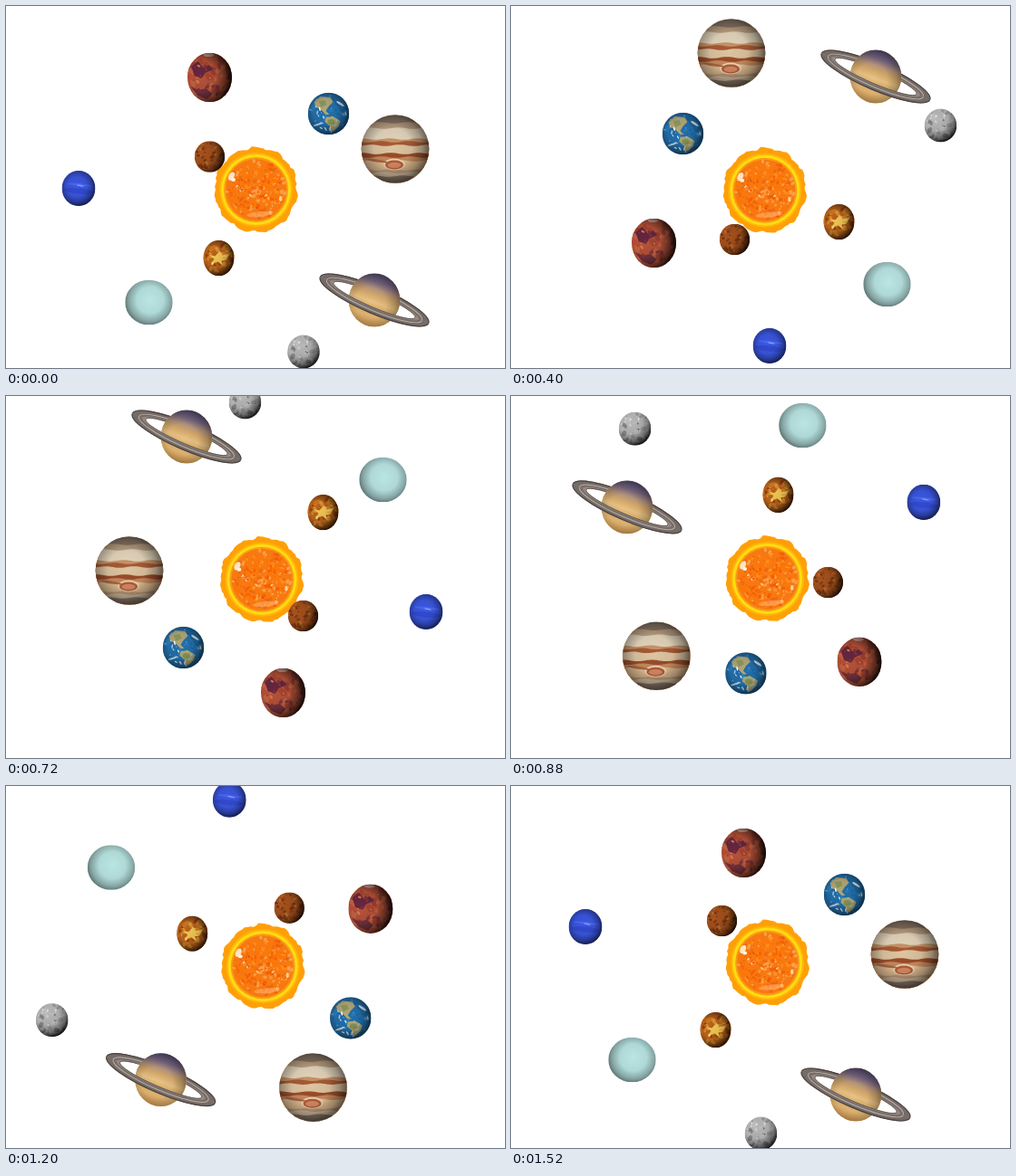
Recreate the animation shown at these times as an HTML page with a canvas. Size 550x400 px, loop 1.6 s.

```html
<!DOCTYPE html>
<html lang="en">
<head>
<meta charset="utf-8">
<title>Planets around the Sun</title>
<style>
  html, body { margin: 0; width: 100%; height: 100%; overflow: hidden; background: #fff; }
  canvas { display: block; width: 550px; height: 400px; }
</style>
</head>
<body>
<canvas id="stage" width="550" height="400"></canvas>
<script>
const ctx = document.getElementById('stage').getContext('2d');
const TAU = Math.PI * 2;
const STEP = 80, STEPS = 20;
const KEY_STEPS = [0, 3, 5, 9, 13, 17, 19];

function seeded(seed) {
  return () => {
    seed = (seed * 16807) % 2147483647;
    return seed / 2147483647;
  };
}

// Orbits: waypoints become angle and radius; `square` bulges the path at its diagonals.
function orbit(points, { cx = 282, cy = 201, sx = 1, square = 0.035 } = {}) {
  const bulge = a => 1 - square * Math.cos(4 * a);
  const angles = [], radii = [];
  points.forEach(([x, y], i) => {
    const dx = (x - cx) / sx, dy = y - cy;
    let a = Math.atan2(dy, dx);
    while (i && a > angles[i - 1]) a -= TAU;
    angles.push(a);
    radii.push(Math.hypot(dx, dy) / bulge(a));
  });
  const angleAt = spline(angles), radiusAt = spline(radii);
  return k => {
    const a = angleAt(k), r = radiusAt(k) * bulge(a);
    return [cx + sx * r * Math.cos(a), cy + r * Math.sin(a)];
  };
}

function spline(values) {
  const t = KEY_STEPS, last = t.length - 1;
  const slope = i => (values[i + 1] - values[i]) / (t[i + 1] - t[i]);
  const tangent = i => {
    if (i === 0) return slope(0);
    if (i === last) return slope(last - 1);
    const before = t[i] - t[i - 1], after = t[i + 1] - t[i];
    return (slope(i - 1) * after + slope(i) * before) / (before + after);
  };
  return k => {
    let i = 0;
    while (i < last - 1 && k >= t[i + 1]) i++;
    const h = t[i + 1] - t[i], u = (k - t[i]) / h, v = 1 - u;
    return v * v * (1 + 2 * u) * values[i] + u * u * (3 - 2 * u) * values[i + 1]
      + h * u * v * (v * tangent(i) - u * tangent(i + 1));
  };
}

function oval(x, y, rx, ry, fill, tilt = 0) {
  ctx.beginPath();
  ctx.ellipse(x, y, rx, ry, tilt, 0, TAU);
  ctx.fillStyle = fill;
  ctx.fill();
}

function shape(fill, ...points) {
  ctx.beginPath();
  points.forEach(([x, y]) => ctx.lineTo(x, y));
  ctx.closePath();
  ctx.fillStyle = fill;
  ctx.fill();
}

function blotches(seed, count, size, reach, colors, flat = 0.6) {
  const rnd = seeded(seed);
  for (let i = 0; i < count; i++) {
    const a = rnd() * TAU, d = Math.sqrt(rnd()) * reach, s = size * (0.4 + rnd());
    oval(Math.cos(a) * d, Math.sin(a) * d, s, s * flat,
      colors[Math.floor(rnd() * colors.length)], rnd() * 3);
  }
}

function radial(x, y, r, ...stops) {
  const g = ctx.createRadialGradient(x, y, 0, x, y, r);
  stops.forEach(([at, color]) => g.addColorStop(at, color));
  return g;
}

// Light comes from (lx, ly), given in radii; `dark` is the depth of the shadow.
function globe(rx, ry, base, { lx = -0.45, ly = -0.25, dark = 0.9, paint }) {
  ctx.save();
  ctx.beginPath();
  ctx.ellipse(0, 0, rx, ry, 0, 0, TAU);
  ctx.clip();
  ctx.fillStyle = base;
  ctx.fillRect(-rx, -ry, rx * 2, ry * 2);
  if (paint) paint();
  const reach = rx * (1.02 + Math.hypot(lx, ly));
  ctx.fillStyle = radial(lx * rx, ly * ry, reach,
    [0, 'rgba(0,0,0,0)'], [0.5, `rgba(0,0,0,${dark * 0.1})`],
    [0.78, `rgba(0,0,0,${dark * 0.5})`], [1, `rgba(0,0,0,${dark})`]);
  ctx.fillRect(-rx, -ry, rx * 2, ry * 2);
  ctx.restore();
}

function sun() {
  const rnd = seeded(71);
  ctx.beginPath();
  for (let i = 0; i < 90; i++) {
    const a = i / 90 * TAU, r = 44.3 + 2.2 * rnd() + Math.sin(a * 11);
    ctx.lineTo(Math.cos(a) * r, Math.sin(a) * r * 1.03);
  }
  ctx.fillStyle = '#ff9f08';
  ctx.fill();
  oval(0, 0, 40.5, 41, '#ffb50a');
  oval(0, 0, 38.5, 39, '#ffdc12');
  oval(0, 0, 35.5, 36, '#fb9a16');
  oval(0, 0, 33.5, 34, '#f8790f');
  blotches(19, 230, 2, 32, ['#f35f08', '#ff8c1c', '#ee6a12', '#ff7300', '#f9a04a'], 0.7);
  blotches(43, 30, 1.4, 30, ['#ffc48a', '#e85000'], 0.6);
  oval(-27, -15, 3, 5, '#ffe4c4', 0.5);
  oval(-25, -11, 2.5, 2, '#fff3e4');
  oval(27, 10, 1.5, 3, '#ffd2a0');
  oval(4, 27, 14, 3, 'rgba(255,190,130,0.5)', -0.1);
}

function mercury() {
  globe(16.7, 17.2, '#a5521d', {
    lx: -0.45, ly: -0.2,
    paint: () => blotches(31, 55, 2, 16, ['#8a3c12', '#bd6a2a', '#743410', '#a64b18'])
  });
}

function venus() {
  globe(17, 19.7, '#b9601b', {
    lx: -0.3, ly: -0.1, dark: 0.8,
    paint: () => {
      blotches(53, 50, 3, 18, ['#9c420f', '#d07b22', '#c4661a', '#dc9230']);
      shape('#efc653', [-12, -4], [-4, -2], [1, -8], [4, -3], [12, -5], [8, 2], [3, 3],
        [5, 9], [-1, 4], [-9, 7], [-5, 1]);
      blotches(17, 16, 1.5, 12, ['#f8e184', '#e2a53a'], 0.5);
    }
  });
}

function earth() {
  globe(22.7, 23.2, '#2270ad', {
    lx: -0.15, ly: -0.1, dark: 0.65,
    paint: () => {
      blotches(12, 20, 4, 20, ['#1c66a3', '#2b7db9']);
      shape('#b3a777', [-16, -13], [-9, -19], [2, -18], [5, -13], [0, -8], [-3, -3],
        [1, 1], [-3, 1], [-9, -5], [-14, -7]);
      shape('#8c995f', [-11, -14], [-4, -15], [-2, -10], [-8, -7]);
      shape('#b1aa72', [-3, 4], [5, 3], [13, 8], [11, 14], [6, 19], [3, 20], [1, 13], [-4, 9]);
      oval(3, 9, 4, 3, '#849555');
      blotches(29, 25, 1.8, 21, ['#d9e8f1', '#ffffff', '#a9cade'], 0.35);
      oval(13, -11, 5, 1.3, '#e4eef4', 0.6);
      oval(-12, 12, 5, 1, '#c9dfeb', -0.3);
    }
  });
}

function mars() {
  globe(24.5, 27.2, '#b5533a', {
    lx: -0.45, ly: -0.05, dark: 0.96,
    paint: () => {
      blotches(83, 55, 4, 25, ['#a8452f', '#c56341', '#b94f36', '#9d4030']);
      shape('#672640', [-20, -12], [-13, -18], [-7, -11], [-1, -14], [4, -9], [-5, -5],
        [-9, 1], [-17, -2]);
      shape('#70303e', [-21, 10], [-12, 14], [-4, 12], [3, 18], [-3, 24], [-13, 20]);
      blotches(37, 18, 2, 22, ['#7d343c', '#d47a50', '#813440']);
      oval(-1, -25, 6, 2, '#d9a99c');
    }
  });
}

function jupiter() {
  globe(37.3, 37.8, '#ddc4a3', {
    lx: -0.08, ly: -0.05, dark: 0.62,
    paint: () => {
      const bands = [[-38, '#8f7b6a'], [-29, '#bda284'], [-23, '#e5d6bd'], [-11, '#c89468'],
        [-8, '#a75a36'], [-4, '#dec5a1'], [5, '#9a4d2c'], [9, '#c98a5c'], [13, '#e0bd93'],
        [23, '#c4a07c'], [26, '#dac3a5'], [30, '#958070']];
      bands.forEach(([top, color], n) => {
        ctx.beginPath();
        ctx.moveTo(-38, 40);
        for (let x = -38; x <= 38; x += 2) ctx.lineTo(x, top + 0.8 * Math.sin(x / 5 + n * 2));
        ctx.lineTo(38, 40);
        ctx.fillStyle = color;
        ctx.fill();
      });
      oval(-1, 17, 12, 6.5, '#edd5b5');
      oval(-1, 17.5, 10, 5, '#b45b38');
      oval(-1, 18, 7.5, 3.2, '#d58a61');
      oval(-20, 13, 12, 1.5, '#a86841', 0.15);
    }
  });
}

function ringHalf(start) {
  const band = (rx, ry, width, color) => {
    ctx.beginPath();
    ctx.ellipse(0, 0, rx, ry, 0, start, start + Math.PI);
    ctx.lineWidth = width;
    ctx.strokeStyle = color;
    ctx.stroke();
  };
  ctx.save();
  ctx.rotate(0.405);
  // Rings are thinner where foreshortened, so nested strokes fill the band.
  for (let i = 0; i <= 14; i++) band(50 + i, 8.6 + i * 0.4, 1.9, i < 4 ? '#918681' : '#756b67');
  band(57, 11.4, 1, '#bbb0a6');
  band(65, 14.6, 1.2, '#49413f');
  band(49, 8, 0.8, '#5a504c');
  ctx.restore();
}

function saturn() {
  ringHalf(Math.PI);
  globe(28.3, 29.4, '#dcae6c', {
    lx: -0.15, ly: 0.1, dark: 0.42,
    paint: () => {
      ctx.rotate(0.35);
      const g = ctx.createLinearGradient(0, -30, 0, 30);
      [[0, '#625783'], [0.17, '#806e8c'], [0.3, '#b8977f'], [0.42, '#d9ac6b'],
        [0.54, '#e9c386'], [0.66, '#dcaa60'], [0.8, '#e5b873'], [1, '#c89250']]
        .forEach(([at, color]) => g.addColorStop(at, color));
      ctx.fillStyle = g;
      ctx.fillRect(-40, -40, 80, 80);
      ctx.rotate(-0.35);
    }
  });
  ringHalf(0);
}

function uranus() {
  globe(26.2, 24.8, '#b9e5e3', { lx: 0.05, ly: -0.1, dark: 0.55 });
}

function neptune() {
  globe(18.4, 19.6, '#3b57e2', {
    lx: -0.1, ly: -0.1, dark: 0.65,
    paint: () => {
      oval(1, -4, 14, 1.5, '#4968ee', 0.1);
      oval(0, 3, 16, 3, '#324bd2', 0.1);
      oval(2, -3, 4, 0.7, '#8fa6ff', 0.2);
    }
  });
}

function moon() {
  globe(17.8, 18.5, '#b9b9b9', {
    lx: -0.3, ly: -0.4, dark: 0.93,
    paint: () => {
      blotches(61, 50, 2.5, 18, ['#a0a0a0', '#cfcfcf', '#8b8b8b', '#c0c0c0'], 0.7);
      blotches(23, 14, 1, 15, ['#ececec', '#6e6e6e'], 0.8);
    }
  });
}

const sunPath = k => [283.2 - 0.034 * (k - 15) ** 2, 203.7 - 0.037 * (k - 4) ** 2];

const bodies = [
  [sun, sunPath],
  [moon, orbit([[328, 382], [468, 262], [473.5, 132], [263.5, 7], [50.5, 127.5], [146, 358],
    [275.5, 384]], { cx: 265, cy: 198, sx: 1.17, square: 0.005 })],
  [neptune, orbit([[80, 201.5], [163, 358.5], [285, 375.5], [463, 238.5], [367, 28.5],
    [132, 52.5], [82, 155.5]], { cx: 272, cy: 200, sx: 1.05 })],
  [uranus, orbit([[157.5, 327.5], [320.5, 365.5], [414.5, 307.5], [415.5, 92.5], [210.5, 30.5],
    [94.5, 199.5], [133.5, 302.5]], { cx: 274 })],
  [saturn, orbit([[406, 325], [446, 174], [402, 78], [199, 45], [123, 226], [275, 355],
    [380, 341]])],
  [jupiter, orbit([[429, 158], [339, 60], [243, 52], [136, 193], [245, 334], [416, 277],
    [434, 186]], { cx: 283, cy: 196 })],
  [mars, orbit([[224.5, 79], [152.5, 179], [157.5, 262], [305.5, 328], [411.5, 214],
    [342.5, 80], [256.5, 74]])],
  [earth, orbit([[355.5, 119], [248.5, 105], [189.5, 141], [195.5, 278], [325.5, 301],
    [390.5, 187], [367.5, 120]])],
  [venus, orbit([[234.5, 278.5], [320.5, 276.5], [361.5, 238.5], [349.5, 128.5], [238.5, 118],
    [205.5, 216], [225.5, 269.5]])],
  [mercury, orbit([[224.5, 166.5], [217.5, 230], [246.5, 258], [327.5, 243], [344.5, 162],
    [271.5, 131], [232.5, 149]], { cx: 280, cy: 196, square: 0 })]
];

function draw(k) {
  ctx.fillStyle = '#fff';
  ctx.fillRect(0, 0, 550, 400);
  for (const [paint, path] of bodies) {
    ctx.save();
    ctx.translate(...path(k));
    paint();
    ctx.restore();
  }
}

const begin = performance.now();
let shown = -1;
function tick() {
  const k = Math.floor((performance.now() - begin) / STEP) % STEPS;
  if (k !== shown) draw(shown = k);
  requestAnimationFrame(tick);
}
tick();
</script>
</body>
</html>
```
